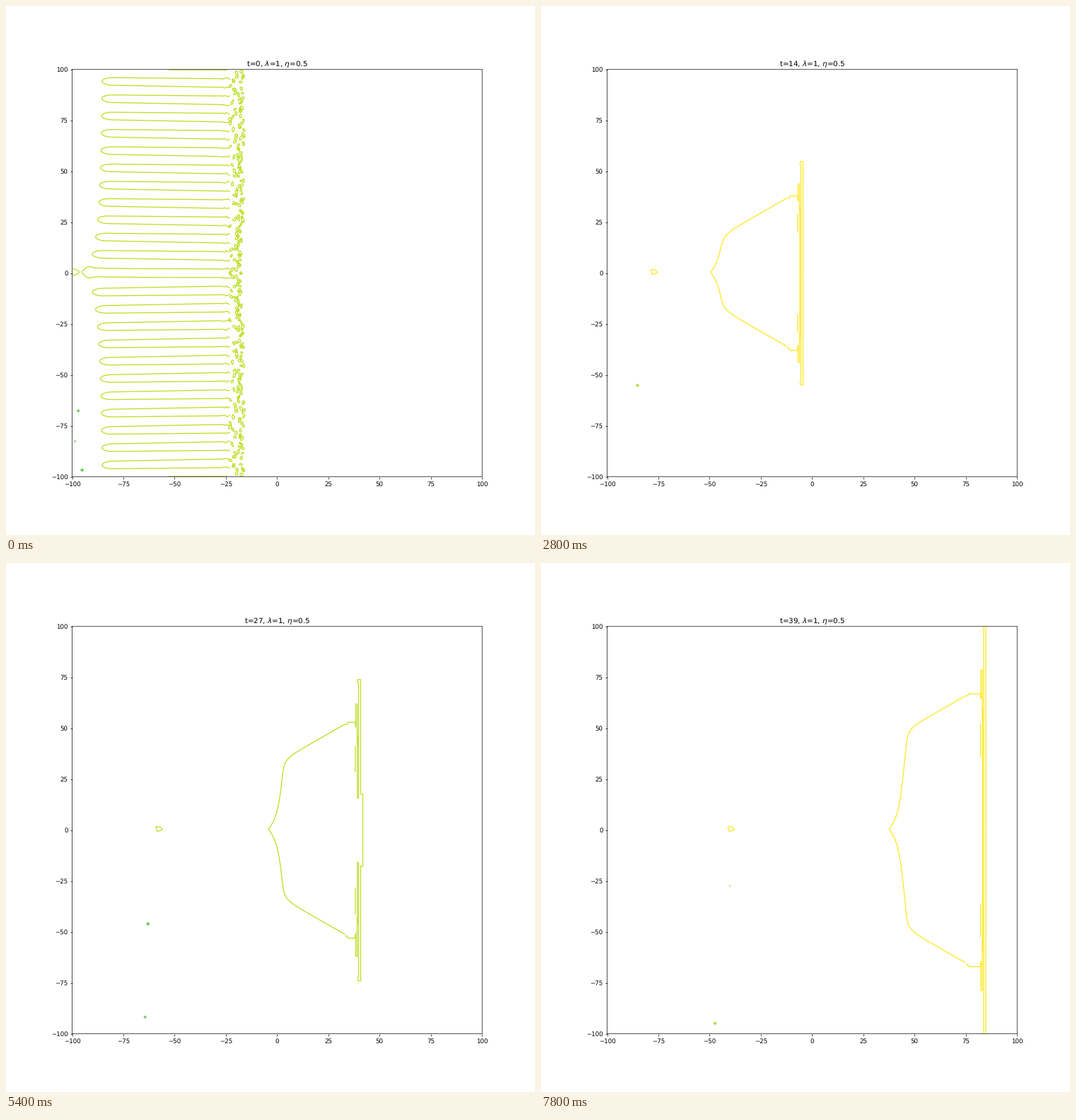
Write a matplotlib script that moves like this. It is 748 by 748 pixels and loops after 8 s.

```python
import numpy as np
import matplotlib.pyplot as plt
from matplotlib.animation import FuncAnimation
from matplotlib.collections import LineCollection

SIZE = 748
FRAMES = 40
MID = 377.8          # pixel row of y = 0
NOSE_MID = 376.5     # symmetry row of the bow wave
PERIOD = 24.45       # vertical distance between opening fingers
YELLOW, LIME, OLIVE, GREEN = "#fde725", "#bddf26", "#addc30", "#6ccd5a"

plt.rcParams.update({"path.snap": False, "text.hinting": "no_hinting"})


def to_data(points):
    """Pixel positions (y down) to axes data units."""
    p = np.asarray(points, float)
    x = (p[:, 0] / SIZE - 0.125) / 0.775 * 200 - 100
    y = (0.89 - p[:, 1] / SIZE) / 0.77 * 200 - 100
    return np.column_stack([x, y])


def mirror(points, mid=MID):
    return np.column_stack([points[:, 0], 2 * mid - points[:, 1]])


def pair(points):
    """Points as (x, height above the middle), with their mirror image."""
    p = np.array(points, float)
    p[:, 1] = MID - p[:, 1]
    return [p, mirror(p)]


def bow(t, height):
    """Fixed nose blending into straight wings that end at the given height."""
    h = np.linspace(0, height, 120)
    nose = 12.5 * (1 - np.exp(-h / 17.5)) + 0.1 * h
    wing = 108.5 + (h - height) / 0.57
    x = 8 * np.logaddexp(nose / 8, wing / 8)
    x += 149 + 10.09 * (t - 5) - x[0]
    upper = np.column_stack([x, NOSE_MID - h])
    return np.vstack([upper[::-1], mirror(upper, NOSE_MID)[1:]])


def front(t):
    """Flat wave front, the pillars behind it and the bow wave."""
    wing = 75 + 3.35 * (t - 5)
    x = np.interp(t, [0, 14, 23, 39], [222, 370.5, 459, 629])
    tall = np.interp(t, [0, 18, 23, 32, 39], [140, 163, 217, 208, 300])
    bulge = np.interp(t, [5, 14, 18, 23, 31], [84, 0, 15, 102, 0])
    foot = np.interp(t, [25, 31, 36], [0, 134, 0])
    pillar = wing * (1 + 0.2 * min(1, t / 14))
    step = 3 * min(1, bulge / 15)

    wave = bow(t, wing)
    tip = wave[0, 0]
    paths = [wave]
    paths += pair([(x - 3, foot), (x - 3, tall - 6), (x - 4, tall - 5), (x - 4, tall),
                   (x, tall), (x, bulge), (x + step, bulge), (x + step, 0)])
    paths += pair([(tip, wing + 1), (tip + 3, wing + 1), (tip + 4, wing + 4),
                   (x - 8, wing + 4), (x - 7, wing - 3), (x - 7, pillar),
                   (x - 5, pillar), (x - 5, 0.82 * wing)])
    if 0.9 * wing > foot:
        paths += pair([(x - 4.6, 0.9 * wing), (x - 4.6, foot)])
    paths += pair([(x - 7.5, 0.8 * wing), (x - 7.5, 0.55 * wing)])

    drop = np.array([(0, 373), (4, 372.5), (7, 374), (9.7, 376.5), (6, 378.5),
                     (2, 379.5), (1.3, 376), (0, 373)])
    paths.append(drop + (116 + 4.353 * (t - 5), 0))
    return paths


def fingers():
    """Opening state: long fingers ending in a band of small loops."""
    rng = np.random.default_rng(4)
    paths = []

    def both(p):
        paths.extend([p, mirror(p)])

    def frayed(y):
        x = np.arange(304, 319, 2.5)
        return np.column_stack([x, y + rng.uniform(-1, 1, len(x)) * (x - 300) / 8])

    def finger(x, centre, half):
        """One outline from upper right round the tip to lower right."""
        top = np.column_stack([x, centre - half])
        low = np.column_stack([x, centre + half])
        paths.append(np.vstack([frayed(top[-1, 1])[::-1], top[::-1],
                                low, frayed(low[-1, 1])]))

    frac = np.linspace(0, 1, 70) ** 2
    for k in range(1, 12):
        tip = 140 - 18 / (1 + 0.35 * (k - 1))
        x = tip + (302 - tip) * frac
        curve = np.sqrt(1 - (1 - np.minimum((x - tip) / 15, 1)) ** 2)
        half = 5.3 * curve + 0.8 * frac
        lift = PERIOD * k + 2.4 * (1 - frac)
        for sign in (-1, 1):
            finger(x, MID + sign * lift, half)

    x = 107 + 195 * frac
    bump = 2.6 * np.exp(-((x - 117) / 6) ** 2)
    half = (6.1 + bump) * (1 - np.exp(-(x - 107) / 4))
    finger(x, MID - 1.5 * (1 - frac) ** 3, half)
    both(np.array([(230, 90.3), (313, 90.5)]))

    x = np.linspace(93, 103.3, 12)
    half = 5.3 * np.sqrt(np.clip((103.3 - x) / 10.3, 0, 1))
    paths.append(np.vstack([np.column_stack([x, 376.3 - half]),
                            np.column_stack([x, 376.3 + half])[::-1]]))

    a = np.linspace(0, 2 * np.pi, 9)
    for y in np.linspace(92, MID, 118):
        cx = rng.triangular(313, 334, 337)
        rx, ry = rng.uniform(1.2, 2.2), rng.uniform(1.3, 3.6)
        r = rng.uniform(0.7, 1.2, 9)
        r[-1] = r[0]
        dy = ry * r * np.sin(a)
        dx = rx * r * np.cos(a) + rng.uniform(-0.5, 0.5) * dy
        both(np.column_stack([cx + dx, y + rng.uniform(-3, 3) + dy]))
    return paths


def specks(t):
    """A few stray points drifting along with the small drop."""
    rng = np.random.default_rng(100 + t)
    n = rng.integers(1, 4)
    x = rng.uniform(max(97, 68 + 4.4 * t), 115 + 4.4 * t, n)
    return np.column_stack([x, rng.uniform(440, 662, n)]), rng.uniform(3, 22, n)


fig, ax = plt.subplots(figsize=(12, 12), dpi=SIZE / 12)
ax.set_xlim(-100, 100)
ax.set_ylim(-100, 100)
lines = ax.add_collection(LineCollection([], linewidths=1.5, joinstyle="round"),
                          autolim=False)
dots = ax.scatter([], [], marker="D", linewidths=0)


def draw(t):
    bright = 1 <= t <= 15 or t >= 36
    lines.set_segments([to_data(p) for p in (front(t) if t else fingers())])
    lines.set_color(YELLOW if bright else LIME)
    places, areas = specks(t)
    dots.set_offsets(to_data(places))
    dots.set_sizes(areas)
    dots.set_color(OLIVE if bright else GREEN)
    ax.set_title(f"t={t}, $\\lambda$=1, $\\eta$=0.5")
    return lines, dots


anim = FuncAnimation(fig, draw, frames=FRAMES, interval=200, repeat=True,
                     repeat_delay=0, init_func=lambda: draw(0))
plt.show()
```
